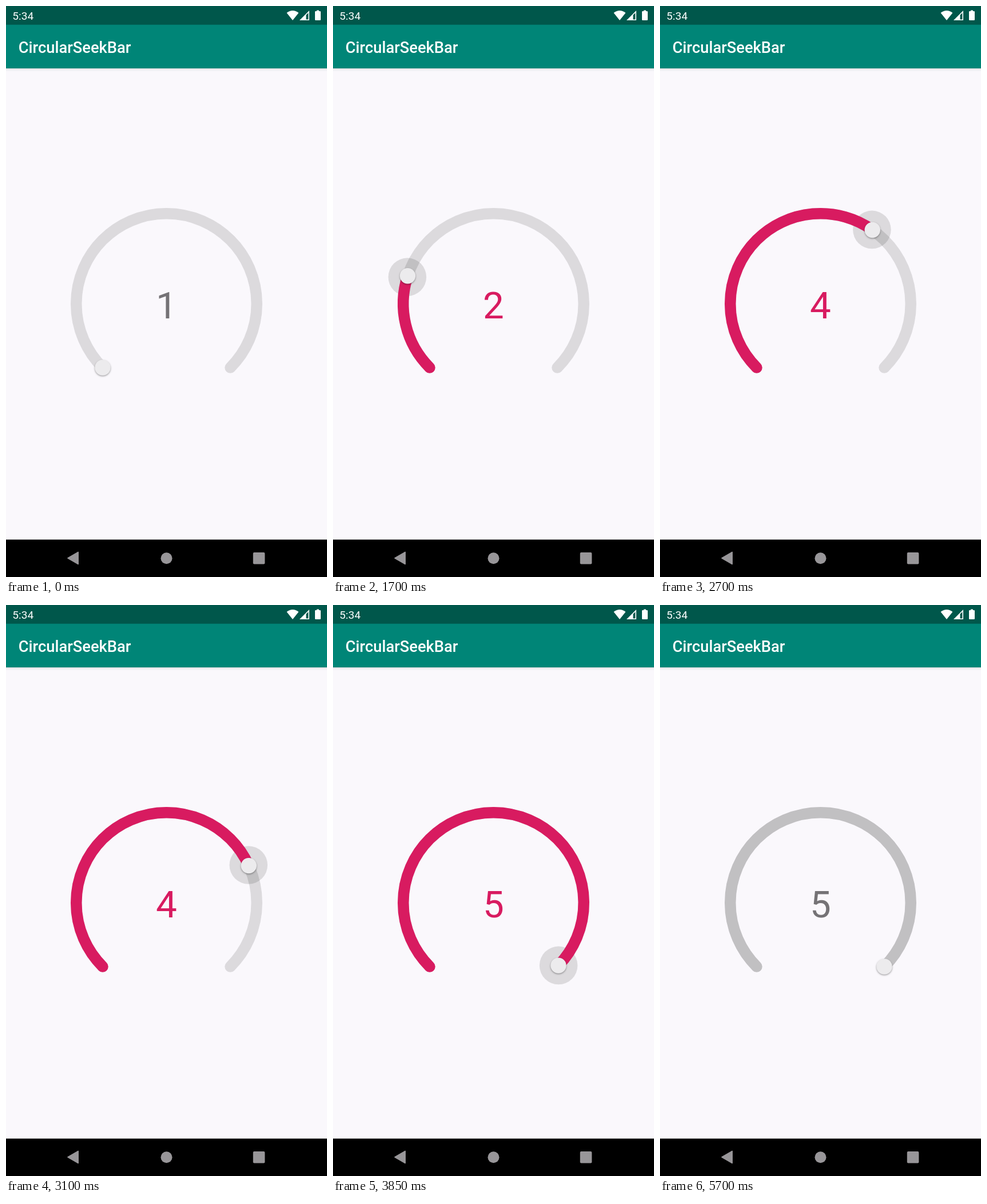
Recreate the animation shown at these times as an HTML page with a canvas. Size 561x998 px, loop 6000 ms.

```html
<!DOCTYPE html>
<html lang="en">
<head>
<meta charset="utf-8">
<title>CircularSeekBar</title>
<style>
  html, body { margin: 0; width: 100%; height: 100%; overflow: hidden; background: #faf8fc; }
  canvas { display: block; width: 561px; height: 998px; }
</style>
</head>
<body>
<canvas id="stage"></canvas>
<script>
const W = 561, H = 998, LOOP = 6000, STEP = 50;
const CX = 280.5, CY = 520.5, R = 157.75, BAR = 19.5;
const START = 135, SWEEP = 270, MAX = 4;
const PRESS = 775, RELEASE = 4040;
const SHADE = 'rgba(0,0,0,0.12)', ACCENT = '#d81b60', FONT = 'Roboto, sans-serif';

// drag path: time in ms, degrees travelled
const path = [[1290, 0], [1350, 7.6], [1700, 63], [2200, 129], [3100, 200.7], [3850, 269], [3950, 270]];

const canvas = document.getElementById('stage');
const ctx = canvas.getContext('2d');
const dpr = window.devicePixelRatio || 1;
canvas.width = W * dpr;
canvas.height = H * dpr;
ctx.scale(dpr, dpr);

const rad = deg => deg * Math.PI / 180;
const clamp = v => Math.min(1, Math.max(0, v));

const slopes = path.map((p, i) => {
  if (i === 0 || i === path.length - 1) return 0;
  const [a, b] = [path[i - 1], path[i + 1]];
  const s1 = (p[1] - a[1]) / (p[0] - a[0]);
  const s2 = (b[1] - p[1]) / (b[0] - p[0]);
  return 2 * s1 * s2 / (s1 + s2);
});

function travel(t) {
  if (t <= path[0][0]) return 0;
  const i = path.findIndex(p => p[0] > t);
  if (i < 0) return SWEEP;
  const [t0, a] = path[i - 1], [t1, b] = path[i];
  const d = t1 - t0, u = (t - t0) / d, v = 1 - u;
  return a * (1 + 2 * u) * v * v + slopes[i - 1] * d * u * v * v
       + b * u * u * (3 - 2 * u) - slopes[i] * d * u * u * v;
}

function rect(x, y, w, h, fill) {
  ctx.fillStyle = fill;
  ctx.fillRect(x, y, w, h);
}

function disc(x, y, r, fill) {
  ctx.fillStyle = fill;
  ctx.beginPath();
  ctx.arc(x, y, r, 0, 2 * Math.PI);
  ctx.fill();
}

function poly(points, fill) {
  ctx.fillStyle = fill;
  ctx.beginPath();
  points.forEach(([x, y]) => ctx.lineTo(x, y));
  ctx.closePath();
  ctx.fill();
}

function label(str, x, y, size, weight, fill, align = 'left') {
  ctx.font = `${weight} ${size}px ${FONT}`;
  ctx.textAlign = align;
  ctx.fillStyle = fill;
  ctx.fillText(str, x, y);
}

function bar(deg, color) {
  ctx.strokeStyle = color;
  ctx.lineWidth = BAR;
  ctx.lineCap = 'round';
  ctx.beginPath();
  ctx.arc(CX, CY, R, rad(START), rad(START + deg));
  ctx.stroke();
}

function onRing(deg) {
  const a = rad(START + deg);
  return [CX + R * Math.cos(a), CY + R * Math.sin(a)];
}

function statusIcons() {
  ctx.fillStyle = '#fff';
  ctx.beginPath();
  ctx.moveTo(501, 25);
  ctx.lineTo(490.6, 12);
  ctx.quadraticCurveTo(501, 4.2, 511.4, 12);
  ctx.closePath();
  ctx.fill();

  poly([[513, 25], [530, 8], [530, 25]], '#fff');
  poly([[524.5, 15.8], [528.4, 11.9], [528.4, 23.4], [524.5, 23.4]], '#00574b');

  ctx.fillStyle = '#fff';
  ctx.beginPath();
  ctx.roundRect(540, 9, 10, 16, 1.3);
  ctx.rect(543, 7.5, 4, 2);
  ctx.fill();
}

function chrome() {
  const g = ctx.createLinearGradient(0, 109, 0, 115);
  g.addColorStop(0, 'rgba(0,0,0,0.13)');
  g.addColorStop(0.4, 'rgba(0,0,0,0.04)');
  g.addColorStop(1, 'rgba(0,0,0,0)');
  rect(0, 109, W, 6, g);
  rect(0, 32, W, 77, '#008577');
  rect(0, 0, W, 32.7, '#00574b');
  label('5:34', 11.3, 24, 19.1, 400, '#fff');
  label('CircularSeekBar', 21.8, 81.5, 27.3, 500, '#fff');
  statusIcons();

  const gray = '#989699';
  rect(0, 932.6, W, H - 932.6, '#000');
  poly([[108, 965], [126.2, 954.5], [126.2, 975.5]], gray);
  ctx.strokeStyle = gray;
  ctx.lineWidth = 1.6;
  ctx.lineJoin = 'round';
  ctx.stroke();
  disc(280.5, 965.2, 10, gray);
  ctx.fillStyle = gray;
  ctx.beginPath();
  ctx.roundRect(431.8, 955, 20.6, 20.6, 2);
  ctx.fill();
}

function ripple(t) {
  if (t < PRESS) return;
  const grow = 1 - Math.pow(1 - clamp((t - PRESS) / 260), 3);
  const alpha = clamp((t - PRESS) / 75) * (1 - clamp((t - RELEASE) / 340));
  if (alpha <= 0) return;
  const [x, y] = onRing(t > 1360 ? travel(t - 5) : 0);
  disc(x, y, 14 + 19.3 * grow, `rgba(0,0,0,${0.12 * alpha})`);
}

function thumb(deg) {
  const [x, y] = onRing(deg);
  ctx.save();
  ctx.shadowColor = 'rgba(0,0,0,0.38)';
  ctx.shadowBlur = 3 * dpr;
  ctx.shadowOffsetY = 1.3 * dpr;
  disc(x, y, 13.7, '#ecebed');
  ctx.restore();
}

function draw(t) {
  const deg = travel(t);
  const active = t >= PRESS && t < RELEASE;
  rect(0, 0, W, H, '#faf8fc');
  chrome();
  ripple(t);
  bar(SWEEP, SHADE);
  if (deg > 0) bar(deg, active ? ACCENT : SHADE);
  thumb(deg);
  const value = 1 + Math.round(deg / SWEEP * MAX);
  label(value, CX, 546, 65.5, 400, active ? ACCENT : '#757376', 'center');
}

const begin = performance.now();
function tick() {
  const t = (performance.now() - begin) % LOOP;
  draw(Math.floor(t / STEP) * STEP);
  requestAnimationFrame(tick);
}
tick();
</script>
</body>
</html>
```
